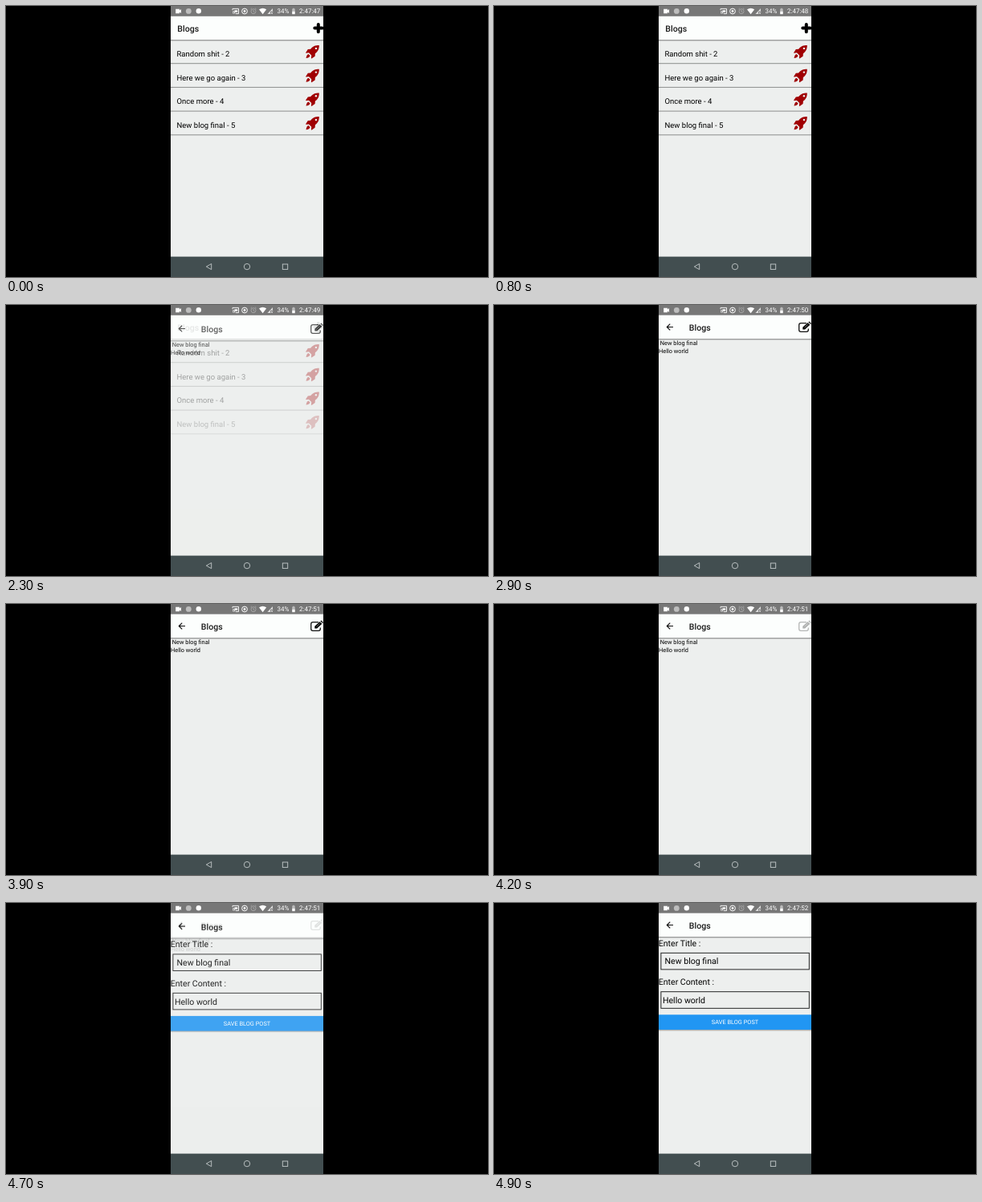
These frames come from a looping animation (600x338 px, 5000 ms). An HTML page:

```html
<!DOCTYPE html>
<html lang="en">
<head>
<meta charset="utf-8">
<title>Blog app</title>
<style>
  html, body { margin: 0; width: 100%; height: 100%; overflow: hidden; background: #000; }
  svg { position: absolute; left: 205px; top: 0; width: 190px; height: 338px; }
  text { font: 7.39px Roboto, sans-serif; white-space: pre; text-rendering: geometricPrecision; }
  .title { font-size: 10.56px; font-weight: 500; fill: #1a1a1a; }
  .row { font-size: 9.5px; }
  .field { font-size: 10.56px; }
  .status { font-size: 8px; fill: #fff; }
  .line { fill: none; stroke: #111; }
</style>
</head>
<body>
<svg viewBox="205 0 190 338">
  <defs>
    <linearGradient id="shade" x2="0" y2="1">
      <stop stop-color="#000" stop-opacity=".42"/>
      <stop offset="1" stop-color="#000" stop-opacity="0"/>
    </linearGradient>
    <g id="rocket">
      <path fill="#a00003" d="M17 .3C12 .3 9 1.6 6.4 5L3 5.3.3 9.5l.3.5 3.6-.4 3.2 3.3-.3 3.6.5.4L11.8 14l.3-3.5C15.6 8 17 5 17 .3Z
        M3.7 11.3C1.5 12 1.3 14 .7 16.4c2.4-.5 4.4-.8 5.1-3Z"/>
      <circle cx="13.1" cy="4.2" r="1.2" fill="#eef0ef"/>
    </g>
    <path id="arrow" class="line" stroke-width="1.2" d="M223 27.5H215.4M219.2 23.6L215.3 27.5L219.2 31.4"/>
  </defs>
  <g id="screens"></g>

  <rect x="205" width="190" height="12.6" fill="#777"/>
  <g fill="#fff">
    <path d="M211.2 3.8h4.8v1.7l2-1.4v4.9l-2-1.4v1.7h-4.8z"/>
    <circle cx="227.3" cy="6.4" r="3.4" fill="#bdbdbd"/>
    <circle cx="239.8" cy="6.3" r="3.2"/>
    <path d="M315 4.2Q319.6 1.2 324.2 4.2L319.6 10.2Z"/>
    <path d="M332 3v3.8h-3v3.2h-3.600Z" opacity=".75"/>
    <path d="M329.600 7.500l2.400 2.400m0-2.400l-2.400 2.400" stroke="#fff" stroke-width=".7"/>
    <path d="M356.200 3.600h.9v-.8h1.700v.8h.9v3h-3.500z" opacity=".5"/>
    <path d="M356.200 6.600h3.500v3.600h-3.500z"/>
    <circle cx="297" cy="6.500" r="1.400"/>
    <path d="M284.400 5.300h3.800v2.400h-3.800z"/>
    <g fill="none" stroke="#fff">
      <circle cx="297" cy="6.500" r="3.400"/>
      <path d="M282 5V3.400h7.500v6.200H286M282 6.500q3 0 3 3.100M282 8.300q1.300 0 1.300 1.300" stroke-width=".9"/>
      <g opacity=".4" stroke-width=".8">
        <circle cx="308" cy="6.700" r="3"/>
        <path d="M308 5v2l1.400.8M304.500 4l1.600-1.400M311.500 4l-1.600-1.400"/>
      </g>
    </g>
  </g>
  <text class="status" x="337.500" y="9.400">34%</text>
  <text class="status" x="365" y="9.400" id="clock"></text>

  <rect x="205" y="312.600" width="190" height="26" fill="#424e50"/>
  <g fill="none" stroke="#c3c9ca" stroke-width=".9">
    <path d="M255.700 321.500V328.700L249.300 325.100Z"/>
    <circle cx="300" cy="325.100" r="3.700"/>
    <rect x="344.300" y="322" width="6.400" height="6.400"/>
  </g>
</svg>
<script>
const $ = id => document.getElementById(id);
const text = (cls, x, y, s) => `<text class="${cls}" x="${x}" y="${y}">${s}</text>`;
const hline = y => `<rect x="205" y="${y}" width="190" height="1" fill="#8c8e8d"/>`;
const box = y => `<rect class="line" x="207.9" y="${y}" width="184.4" height="20.6" stroke-width=".9"/>`;

// A full page: body, white header bar with its shadow, and content
const screen = (id, titleX, icons, content) => `
  <g id="${id}">
    <rect x="205" y="12.500" width="190" height="326" fill="#edefee"/>
    <rect x="205" y="12.500" width="190" height="29.500" fill="#fcfefd"/>
    <rect x="205" y="42" width="190" height="2.400" fill="url(#shade)"/>
    <g id="${id}Head">${text("title", titleX, 32, "Blogs")}${icons}</g>
    ${content}
  </g>`;

const rows = ["Random shit - 2", "Here we go again - 3", "Once more - 4", "New blog final - 5"]
  .map((s, i) => {
    const y = 29.7 * i;
    return `<g id="row${i}">${text("row", 212.5, 63 + y, s)}
      <use href="#rocket" x="372.800" y="${48.7 + y}"/>${hline(71.2 + y)}</g>`;
  }).join("");

const plus = `<path d="M388.800 23V32.200M384.300 27.500H393.500" stroke="#000" stroke-width="4" stroke-linecap="round"/>`;
const back = `<use href="#arrow"/>`;
const edit = `<g id="edit">
  <path class="line" stroke-width="1.300" d="M389 22.700H382Q379.700 22.700 379.700 25V31Q379.700 33.300 382 33.300H389Q391.300 33.300 391.300 31V29.500"/>
  <path d="M384.300 30.600V27.800L390.600 21.900 393.300 24.700 387.100 30.600ZM391.300 21.300L392.400 20.400 395 23 394 24Z"/>
  <path d="M386.500 28.200L390.500 24.400" stroke="#fcfefd" stroke-width=".5"/></g>`;

$("screens").innerHTML =
  screen("list", 213.3, plus, rows) +
  screen("detail", 242.8, back + edit,
    text("", 205, 50.4, " New blog final") + text("", 205, 60.4, "Hello world")) +
  screen("form", 242.8, `<g id="formBack">${back}</g>`,
    text("field", 204.8, 53.6, "Enter Title :") + box(62.3) + text("field", 212.6, 76.3, "New blog final") +
    text("field", 204.8, 102.3, "Enter Content :") + box(110.7) + text("field", 210, 125, "Hello world") +
    `<rect x="205" y="157.500" width="190" height="2.600" fill="url(#shade)"/>
     <rect x="205" y="139.300" width="190" height="18.700" fill="#2196f3"/>
     <text x="300" y="151.400" text-anchor="middle" fill="#fff">SAVE BLOG POST</text>`);

const fade = (id, a) => $(id).setAttribute("opacity", a);

// Each step is [opacity, y offset]; the page then rests in place
function enter(id, tick, steps) {
  const [a, dy] = tick < 0 ? [0, 0] : steps[tick] || [1, 0];
  fade(id, a);
  $(id).setAttribute("transform", `translate(0 ${dy})`);
}

const seconds = [8, 18, 29, 39, 49];
const start = performance.now();

function draw() {
  const tick = Math.floor((performance.now() - start) % 5000 / 100);
  $("clock").textContent = "2:47:" + (47 + seconds.filter(s => tick >= s).length);

  fade("row3", tick < 20 ? 1 : tick < 23 ? .25 : .6);
  fade("listHead", tick < 23 ? 1 : .3);
  enter("detail", tick - 23, [[.68, 2], [.92, .5]]);

  fade("edit", tick < 42 ? 1 : tick < 46 ? .3 : .75);
  enter("form", tick - 46, [[.58, 6], [.85, 1.6], [.97, .4]]);
  fade("formBack", tick > 46 ? 1 : 0);
  requestAnimationFrame(draw);
}
draw();
</script>
</body>
</html>
```
